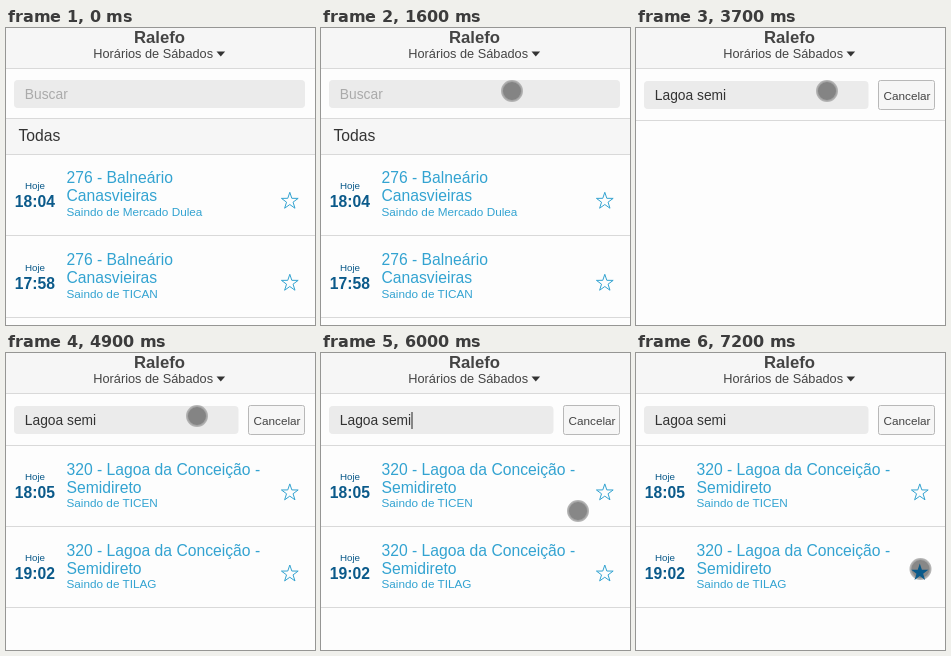
Recreate the animation shown at these times as an HTML page. Size 309 by 297 pixels, loop 8 s.

```html
<!DOCTYPE html>
<html lang="pt">
<head>
<meta charset="utf-8">
<title>Horários</title>
<style>
html, body { margin: 0; width: 100%; height: 100%; overflow: hidden; background: #fdfdfd; }
svg { display: block; width: 309px; height: 297px; font-family: "Liberation Sans", Arial, sans-serif; }
</style>
</head>
<body>
<svg id="stage" viewBox="0 0 309 297"></svg>
<script>
const LOOP = 8000, STEP = 100;
const BLUE = '#33a3d1', NAVY = '#0b5a8a', INK = '#444', LINE = '#d9d9d9';
const NS = 'http://www.w3.org/2000/svg';
const stage = document.getElementById('stage');

function add(parent, tag, attrs, content) {
  const el = document.createElementNS(NS, tag);
  for (const k in attrs) el.setAttribute(k, attrs[k]);
  if (content) el.textContent = content;
  parent.appendChild(el);
  return el;
}
const group = () => add(stage, 'g', {});
const rect = (p, x, y, width, height, fill, more) =>
  add(p, 'rect', { x, y, width, height, fill, ...more });
const rule = (p, y) => rect(p, 0, y, 309, 1, LINE);
const text = (p, x, y, size, fill, str, more) =>
  add(p, 'text', { x, y, 'font-size': size, fill, ...more }, str);
const show = (el, on) => el.setAttribute('visibility', on ? 'visible' : 'hidden');
const MID = { 'text-anchor': 'middle' };
const BOLD = { ...MID, 'font-weight': 'bold' };

function star(parent, cx, cy, r, attrs) {
  const pts = Array.from({ length: 10 }, (_, i) => {
    const a = i * Math.PI / 5, d = i % 2 ? r * 0.39 : r;
    return (cx + d * Math.sin(a)).toFixed(2) + ',' + (cy - d * Math.cos(a)).toFixed(2);
  });
  return add(parent, 'polygon', { points: pts.join(' '), ...attrs });
}

// One departure; y is the middle of its first title line
function row(parent, y, bottom, time, title, from) {
  text(parent, 29, y + 10.3, 9.8, NAVY, 'Hoje', MID);
  text(parent, 28.8, y + 28.4, 15.7, NAVY, time, BOLD);
  title.forEach((s, i) => text(parent, 60.5, y + 5.2 + i * 17.6, 15.7, BLUE, s));
  text(parent, 60.5, y + 37.3, 11.75, BLUE, 'Saindo de ' + from);
  rule(parent, bottom);
  return star(parent, 283.8, y + 22.9, 8.8, { fill: 'none', stroke: BLUE, 'stroke-width': 1 });
}

// Header
rect(stage, 0, 0, 309, 40, '#f6f6f6');
rule(stage, 40);
text(stage, 153.5, 15, 16.7, INK, 'Ralefo', BOLD);
text(stage, 87.3, 30.4, 12.75, INK, 'Horários de Sábados');
add(stage, 'path', { d: 'M210.5 23.5h8.6l-4.3 5z', fill: '#333' });

// Full list
const home = group();
rect(home, 8, 52, 291, 28, '#ebebeb', { rx: 4 });
text(home, 18.8, 71.3, 13.8, '#aaa', 'Buscar');
rect(home, 0, 90, 309, 37, '#f6f6f6');
rule(home, 90);
rule(home, 126);
text(home, 12.5, 113, 15.7, '#333', 'Todas');
const beach = ['276 - Balneário', 'Canasvieiras'];
row(home, 150.2, 207, '18:04', beach, 'Mercado Dulea');
row(home, 232.2, 289, '17:58', beach, 'TICAN');

// Search
const search = group();
rect(search, 8, 53, 224.5, 28, '#ebebeb', { rx: 4 });
rect(search, 242.5, 52.5, 56, 29, '#f6f6f6', { rx: 2, stroke: '#b8b8b8' });
text(search, 271, 71.5, 11.75, INK, 'Cancelar', MID);
rule(search, 92);
const hint = text(search, 18.8, 72, 13.8, '#aaa', 'Buscar');
const query = text(search, 18.8, 72, 13.8, '#333', 'Lagoa semi');
const caret = rect(search, 19.5, 59, 1, 17, '#222');

const results = group();
const lagoon = ['320 - Lagoa da Conceição -', 'Semidireto'];
row(results, 116.8, 173, '18:05', lagoon, 'TICEN');
const lastStar = row(results, 197.9, 254, '19:02', lagoon, 'TILAG');

// Pointer
const pointer = add(stage, 'circle', {
  r: 10, fill: '#6c6c6c', 'fill-opacity': 0.82, stroke: '#a8a8a8', 'stroke-opacity': 0.85, 'stroke-width': 2
});
const favourite = star(stage, 283.8, 219.6, 9, { fill: NAVY });

// time, x, y
const path = [
  [900, 300, 103], [1000, 277, 89], [1100, 252, 79], [1300, 214, 67], [1600, 191, 63],
  [5400, 191, 63], [5700, 229, 108], [6000, 257, 158], [6300, 277, 200],
  [6400, 281, 209], [6500, 284.5, 216], [LOOP, 284.5, 216]
];
function pointerAt(t) {
  const i = Math.max(1, path.findIndex(p => p[0] >= t));
  const [t0, x0, y0] = path[i - 1], [t1, x1, y1] = path[i];
  const k = (t - t0) / (t1 - t0);
  return [x0 + (x1 - x0) * k, y0 + (y1 - y0) * k];
}

const blinks = [2200, 2800, 3100, 3700, 4300, 4900, 5500, 6100, 6700, 7200];

function draw(now) {
  const t = Math.floor(now % LOOP / STEP) * STEP;
  const open = t >= 2200, typed = t >= 3100, found = t >= 3800, starred = t >= 6700;
  show(home, !open);
  show(search, open);
  show(hint, open && !typed);
  show(query, typed);
  show(results, found);
  show(lastStar, found && !starred);
  show(favourite, starred);
  show(caret, blinks.filter(b => b <= t).length % 2 === 1);
  caret.setAttribute('x', typed ? 90.5 : 19.5);
  show(pointer, t >= 900);
  if (t >= 900) {
    const [x, y] = pointerAt(t);
    pointer.setAttribute('cx', x);
    pointer.setAttribute('cy', y);
  }
}

const start = performance.now();
function tick() {
  draw(performance.now() - start);
  requestAnimationFrame(tick);
}
tick();
</script>
</body>
</html>
```
